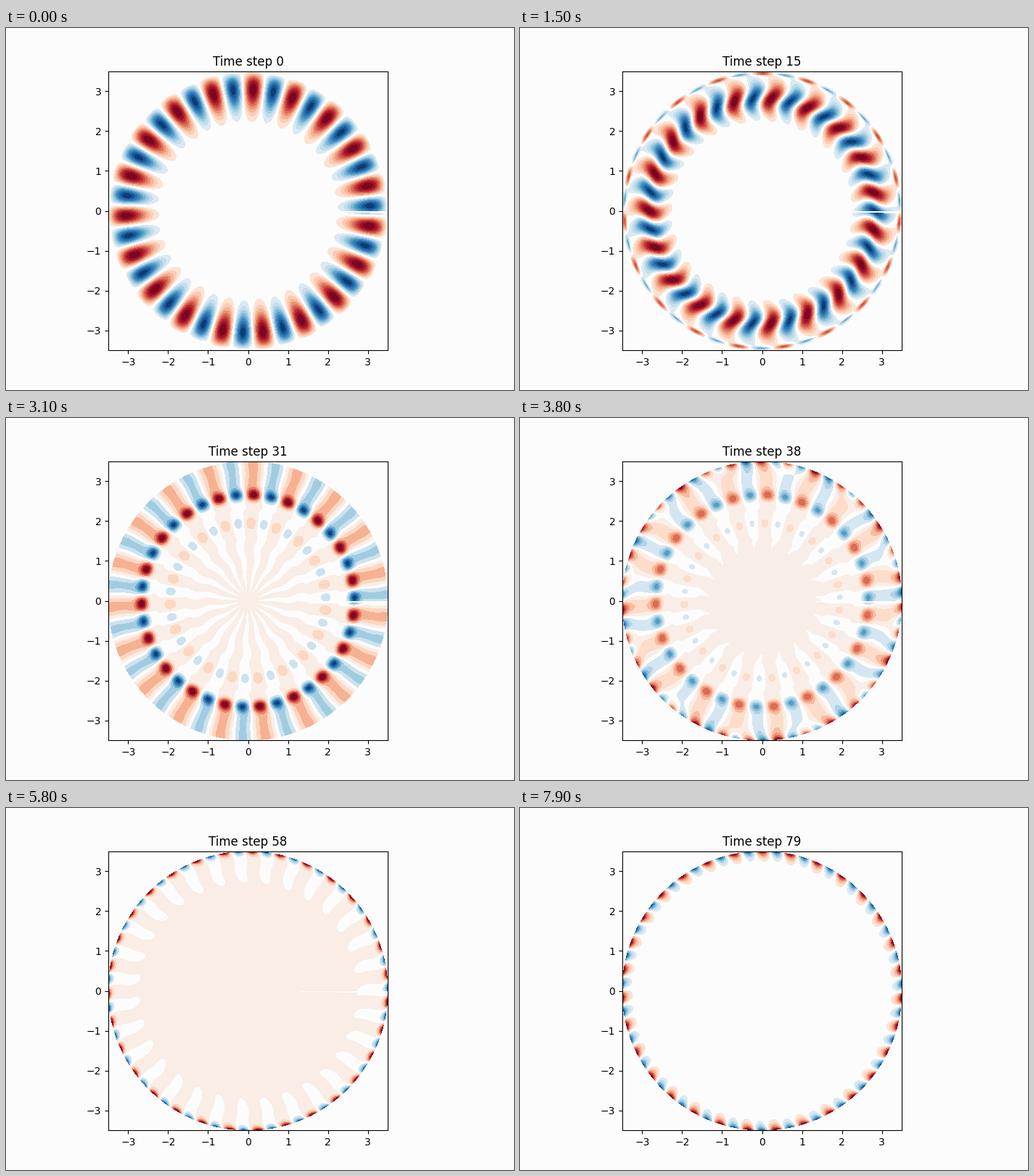
These frames come from a looping animation (700x500 px, 8 s). A matplotlib script:

```python
import numpy as np
import matplotlib
import matplotlib.pyplot as plt
from matplotlib.animation import FuncAnimation

STEPS = 80
R = 3.5
PAPER = "#fcfcfc"
CMAP = matplotlib.colormaps["RdBu_r"]

# the polar mesh stays open at angle zero, which leaves the thin seam
N = 300
r = np.linspace(0.02, R, 120)
theta = np.arange(N) * 2 * np.pi / N
X, Y = np.outer(r, np.cos(theta)), np.outer(r, np.sin(theta))
turn = np.pi / 2 - theta  # clockwise angle from the top
depth = R - r


def bump(center, width):
    return np.exp(-((r - center) / width) ** 2)


def smooth(x):
    x = np.clip(x, 0, 1)
    return x * x * (3 - 2 * x)


def spin(angle):
    """Phase that turns a 19-fold pattern clockwise by the given angle."""
    return np.exp(19j * angle)


def whisper():
    """Bessel function J19 with its first zero on the rim."""
    tau = np.linspace(0, np.pi, 400)
    f = np.cos(19 * tau - np.outer(24.27 * r / R, np.sin(tau)))
    j = f[:, :-1].sum(axis=1) + (f[:, -1] - f[:, 0]) / 2
    return j / j.max() * spin(0.0426)


def sheared():
    """S-shaped spokes inside a ring of thin lenses."""
    bend = 0.092 + 0.033 * np.sin(2 * np.pi * (r - 2.87))
    return bump(2.83, 0.38) * spin(bend) + 0.65 * bump(3.45, 0.04)


def split():
    """Bright core ring, flat outer spokes, faint inner ring and zigzags."""
    outer = 0.36 / (1 + np.exp((2.72 - r) / 0.04))
    bend = 0.045 + 0.025 * r * np.sin(2 * np.pi * r / 0.75)
    return (bump(2.65, 0.14) * spin(0.055)
            + (outer + 0.3 * bump(1.95, 0.16)) * spin(0.038)
            + 0.02 * (r / R) ** 3 * spin(bend))


START, MIDDLE, LATE = whisper(), sheared(), split()


def inner_wave(t):
    a, b = np.clip(t / 15, 0, 1), np.clip((t - 15) / 16, 0, 1)
    profile = (1 - b) * ((1 - a) * START + a * MIDDLE) + b * LATE
    return (profile[:, None] * spin(-turn)).real + 2e-6


def edge_wave(t):
    """31-fold wave that clings to the rim and sways back and forth."""
    angle = np.interp(t, [46, 58, 69, 79], [-0.014, 0.029, -0.03, 0])
    decay = 9 + 5 * np.exp(-((t - 58) / 5) ** 2)
    twist = 0.04 * max(0, np.cos(2 * np.pi * (t - 58) / 22))
    shift = angle + twist * (depth + 0.2 * np.sin(9 * depth))
    wave = np.cos(31 * (turn - shift[:, None]))
    return np.exp(-decay * depth)[:, None] * wave + np.exp(-0.8 * decay)


def field(t):
    w = smooth((t - 33) / 9)
    u = (1 - w) * inner_wave(t) + w * edge_wave(t)
    return 0.9999 * u / np.abs(u).max()


def half_bands(t):
    """Number of colour bands on each side of zero."""
    return 10 - int(round(3 * abs(np.sin(np.pi * max(t - 15, 0) / 32))))


def band_colors(n):
    """Diverging band colours; the faintest ones fade into the paper."""
    cols = [CMAP((i + 0.5) / (2 * n)) for i in range(2 * n)]
    return [PAPER if c[1] > 0.939 else c for c in cols]


fig = plt.figure(figsize=(7, 5), dpi=100, facecolor=PAPER)
ax = fig.add_axes([141 / 700, 0.11, 385 / 700, 0.77], facecolor=PAPER)
title = ax.set_title("Time step 0")
shown = []


def draw(t):
    while shown:
        shown.pop().remove()
    n = half_bands(t)
    shown.append(ax.contourf(X, Y, field(t), colors=band_colors(n),
                             levels=np.linspace(-1, 1, 2 * n + 1)))
    ax.set(xlim=(-3.499, 3.499), ylim=(-3.499, 3.499),
           xticks=range(-3, 4), yticks=range(-3, 4))
    title.set_text(f"Time step {t}")
    return shown + [title]


anim = FuncAnimation(fig, draw, frames=STEPS, interval=100,
                     repeat=True, repeat_delay=0, blit=False)
plt.show()
```
